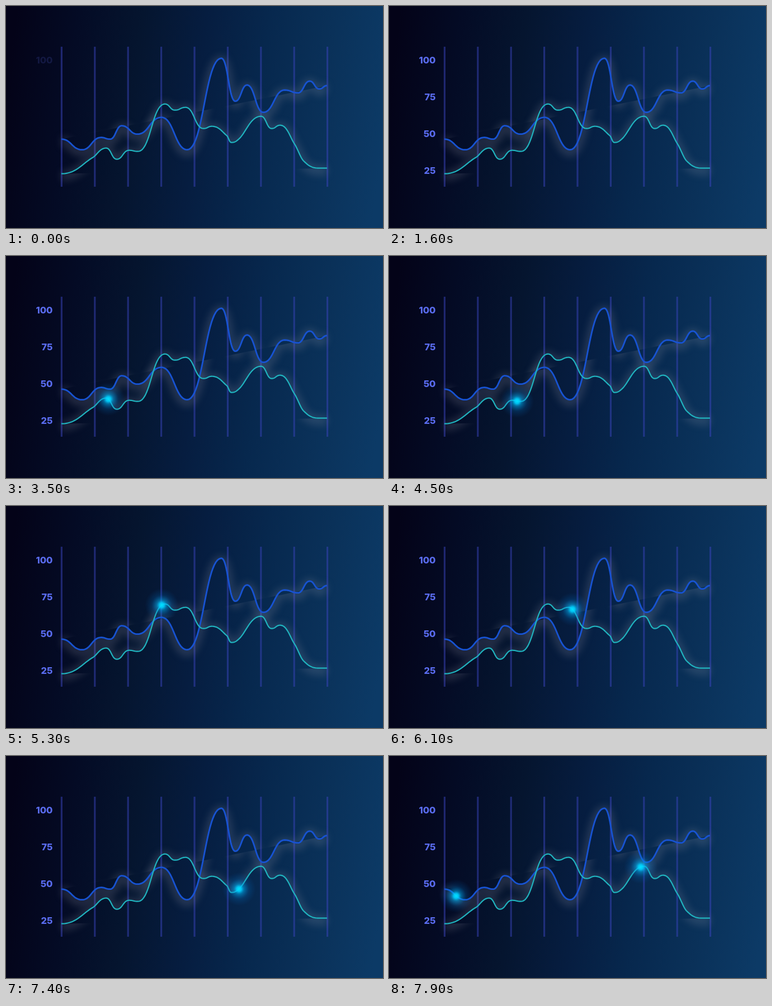
These frames come from a looping animation (674 by 398 pixels, 8000 ms). An HTML page with a canvas:

```html
<!DOCTYPE html>
<html lang="en">
<head>
<meta charset="utf-8">
<title>Line chart</title>
<style>
html, body { margin: 0; width: 100%; height: 100%; overflow: hidden; background: #04041a; }
canvas { display: block; }
</style>
</head>
<body>
<canvas id="stage" width="674" height="398"></canvas>
<script>
const W = 674, H = 398, LOOP = 8000, STEP = 100;
const ctx = document.getElementById('stage').getContext('2d');
const clamp = v => Math.max(0, Math.min(1, v));

// Peaks, valleys and a few points on the slopes.
const blue = smooth([
  [99, 239], [136, 258], [170, 236], [186, 239], [207, 215], [235, 230], [278, 200], [324, 258],
  [385, 94], [410, 171], [431, 142], [460, 191], [498, 151], [522, 156], [543, 135], [560, 149], [574, 143]
]);
const teal = smooth([
  [99, 301], [155, 272], [179, 255], [198, 275], [220, 259], [236, 261], [284, 176], [302, 187], [321, 182],
  [353, 220], [368, 216], [395, 233], [403, 245], [416, 239], [456, 198], [475, 220], [490, 214],
  [516, 248], [532, 278], [560, 291], [574, 291]
]);

// Time and x of each travelling dot; y follows the curve.
const dots = [
  { line: teal, keys: [[2200, 99], [3000, 130], [3500, 183], [3900, 193], [4500, 229], [6100, 328], [6900, 383], [7900, 450]] },
  { line: blue, keys: [[7600, 100], [7900, 120]] }
];

// Bezier through the points, flat at every turning point, as a fine polyline.
function smooth(pts) {
  const slope = (a, b) => (b[1] - a[1]) / (b[0] - a[0]);
  const tangent = pts.map((p, i) => {
    const a = pts[i - 1], b = pts[i + 1];
    return a && b && slope(a, p) * slope(p, b) > 0 ? slope(a, b) : 0;
  });
  const bezier = (a, b, c, d, s) => {
    const r = 1 - s;
    return r * r * r * a + 3 * r * r * s * b + 3 * r * s * s * c + s * s * s * d;
  };
  const out = [pts[0]];
  for (let i = 1; i < pts.length; i++) {
    const [x0, y0] = pts[i - 1], [x1, y1] = pts[i], m0 = tangent[i - 1], m1 = tangent[i];
    const d0 = (x1 - x0) * (m0 ? 0.33 : 0.48), d1 = (x1 - x0) * (m1 ? 0.33 : 0.48);
    for (let s = 1; s <= 24; s++) {
      out.push([
        bezier(x0, x0 + d0, x1 - d1, x1, s / 24),
        bezier(y0, y0 + m0 * d0, y1 - m1 * d1, y1, s / 24)
      ]);
    }
  }
  return out;
}

// Linear lookup in a list of pairs.
function lookup(pairs, at) {
  const i = Math.max(1, pairs.findIndex(p => p[0] >= at));
  const [a, va] = pairs[i - 1], [b, vb] = pairs[i];
  return va + (vb - va) * clamp((at - a) / (b - a));
}

function toPath(points) {
  const path = new Path2D();
  points.forEach(([x, y]) => path.lineTo(x, y - 0.3));
  return path;
}

// Soft halo of the line, cut away between the line and its end-to-end chord.
function halo(g, path) {
  const mask = new Path2D();
  mask.rect(0, 0, W, H);
  mask.addPath(path);
  g.save();
  g.clip(mask, 'evenodd');
  g.filter = 'blur(7px)';
  g.strokeStyle = 'rgba(160,160,175,0.2)';
  g.lineWidth = 17;
  g.translate(0, 4);
  g.stroke(path);
  g.restore();
}

function stroke(g, path, color, width) {
  g.strokeStyle = color;
  g.lineWidth = width;
  g.lineJoin = 'round';
  g.stroke(path);
}

function buildScene() {
  const scene = document.createElement('canvas');
  scene.width = W;
  scene.height = H;
  const g = scene.getContext('2d');
  const bg = g.createLinearGradient(0, 160, W, 240);
  ['#040318', '#040b25', '#05152f', '#061d40', '#07284e', '#0a3159', '#0c3a66']
    .forEach((c, i) => bg.addColorStop(i / 6, c));
  g.fillStyle = bg;
  g.fillRect(0, 0, W, H);

  g.fillStyle = 'rgba(58,68,190,0.5)';
  for (let i = 0; i < 9; i++) g.fillRect(97.8 + i * 59.4, 73, 3.2, 251);
  const bluePath = toPath(blue), tealPath = toPath(teal);
  halo(g, bluePath);
  halo(g, tealPath);
  stroke(g, bluePath, '#1753d3', 2.8);
  stroke(g, tealPath, '#1fb4bf', 2.2);
  return scene;
}

function drawDot({ line, keys }, t) {
  const age = t - keys[0][0], r = 30;
  if (age < 0) return;
  const x = lookup(keys, t), y = lookup(line, x);
  const glow = ctx.createRadialGradient(x, y, 0, x, y, r);
  glow.addColorStop(0, 'rgba(0,226,255,1)');
  glow.addColorStop(0.14, 'rgba(0,208,255,0.93)');
  glow.addColorStop(0.3, 'rgba(0,170,238,0.55)');
  glow.addColorStop(0.6, 'rgba(0,125,212,0.2)');
  glow.addColorStop(1, 'rgba(0,100,190,0)');
  ctx.globalAlpha = clamp((age + 100) / 300);
  ctx.fillStyle = glow;
  ctx.fillRect(x - r, y - r, 2 * r, 2 * r);
}

const scene = buildScene();

function draw(t) {
  ctx.globalAlpha = 1;
  ctx.drawImage(scene, 0, 0);
  ctx.font = '800 16.5px Inter, "Open Sans", sans-serif';
  ctx.textAlign = 'right';
  ctx.fillStyle = '#5a6cf0';
  for (let i = 0; i < 4; i++) {
    ctx.globalAlpha = clamp((t + 120 - i * 300) / 700);
    ctx.fillText(100 - 25 * i, 83.5, 103 + 66 * i);
  }
  dots.forEach(d => drawDot(d, t));
}

const start = performance.now();
function tick() {
  const t = (performance.now() - start) % LOOP;
  draw(Math.floor(t / STEP) * STEP);
  requestAnimationFrame(tick);
}
tick();
</script>
</body>
</html>
```
